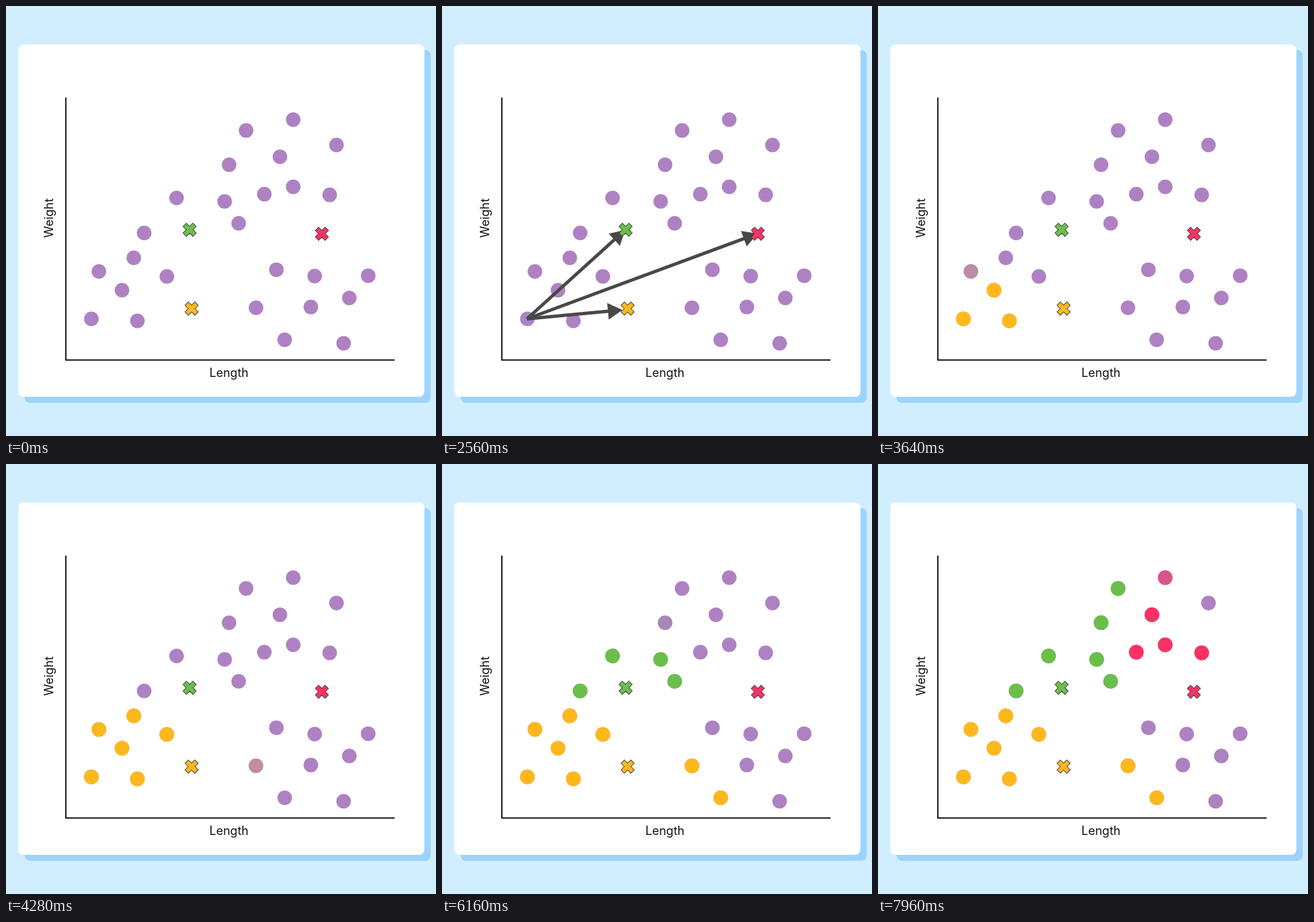
An HTML page for the animation above (8000 ms loop, 648 by 648 pixels).

```html
<!DOCTYPE html>
<html lang="en">
<head>
<meta charset="utf-8">
<title>Clustering</title>
<style>
  html, body { margin: 0; width: 100%; height: 100%; overflow: hidden; background: #d1eeff; }
  svg { display: block; width: 100%; height: 100%; }
  text { font: 18px Inter, sans-serif; text-anchor: middle; fill: #111; }
</style>
</head>
<body>
<svg id="stage" viewBox="0 0 648 648">
  <rect width="648" height="648" fill="#d1eeff"/>
  <rect x="28" y="66.5" width="612" height="531.5" rx="8" fill="#9dd4ff"/>
  <rect x="18.5" y="58" width="612" height="531" rx="8" fill="#fff"/>
  <path d="M90.2 138V533.4H585.5" fill="none" stroke="#111" stroke-width="2"/>
  <text x="336" y="559">Length</text>
  <text transform="translate(71 319.5) rotate(-90)">Weight</text>
  <g id="dots"></g>
  <g id="arrows" fill="#484848" stroke="#484848"></g>
  <g id="marks" stroke="#484848" stroke-width="1"></g>
</svg>
<script>
const LOOP = 8000;
const COLORS = { purple: '#ae82c2', gold: '#ffb81c', green: '#6abf4b', red: '#fa3264' };

// x, y, cluster colour, fade start, fade length
const DOTS = [
  [128.7, 471.5, 'gold', 2760, 300],
  [198, 474.5, 'gold', 3060, 300],
  [174.8, 428.3, 'gold', 3360, 260],
  [140, 400, 'gold', 3600, 240],
  [192.6, 379.5, 'gold', 3800, 220],
  [242.4, 407.5, 'gold', 3980, 220],
  [376.7, 454.8, 'gold', 4200, 360],
  [208.2, 342, 'green', 4560, 420],
  [420, 503, 'gold', 4860, 300],
  [257, 289.3, 'green', 5020, 280],
  [329.5, 294.5, 'green', 5280, 280],
  [350.6, 327.5, 'green', 5560, 280],
  [336.2, 239.2, 'green', 6130, 280],
  [361.8, 187.6, 'green', 6400, 280],
  [389.3, 283.6, 'red', 6680, 280],
  [412.8, 227.2, 'red', 6960, 280],
  [432.8, 272.5, 'red', 7240, 280],
  [487.8, 284.6, 'red', 7520, 280],
  [432.8, 171.3, 'red', 7800, 280],
  [498, 209.5], [407.5, 397.4], [465.2, 407], [545.8, 406.4],
  [517.4, 440], [459.4, 453.6], [508.8, 508.3]
];

// tip x, tip y, grow start, fade start
const ARROWS = [
  [272, 458, 720, 2560],
  [276, 337.5, 940, 2640],
  [475.5, 343, 1157, 2755]
];
const TAIL = { x: 128, y: 471.5 }, GROW = 400, FADE = 195;

const MARKS = [[276.7, 337.2, 'green'], [279.7, 456, 'gold'], [476, 343.2, 'red']];

const clamp = v => Math.max(0, Math.min(1, v));
const ease = p => p < 0.5 ? 2 * p * p : 1 - 2 * (1 - p) ** 2;

function add(parent, tag, attrs) {
  const el = document.createElementNS('http://www.w3.org/2000/svg', tag);
  for (const key in attrs) el.setAttribute(key, attrs[key]);
  return document.getElementById(parent).appendChild(el);
}

const fades = [];
for (const [cx, cy, color, start, length] of DOTS) {
  add('dots', 'circle', { cx, cy, r: 11, fill: COLORS.purple });
  if (color) {
    const el = add('dots', 'circle', { cx, cy, r: 11.1, fill: COLORS[color], opacity: 0 });
    fades.push({ el, start, length });
  }
}

const arrows = ARROWS.map(([x, y, grow, fade]) => {
  const dx = x - TAIL.x, dy = y - TAIL.y;
  const angle = Math.atan2(dy, dx) * 180 / Math.PI;
  const el = add('arrows', 'path', {
    transform: `translate(${TAIL.x} ${TAIL.y}) rotate(${angle})`, 'stroke-width': 0
  });
  return { el, size: Math.hypot(dx, dy), grow, fade };
});

for (const [x, y, color] of MARKS) {
  add('marks', 'path', {
    d: 'M-10.5-3.6h6.9v-6.9h7.2v6.9h6.9v7.2h-6.9v6.9h-7.2v-6.9h-6.9z',
    transform: `translate(${x} ${y}) rotate(45)`, fill: COLORS[color]
  });
}

function arrowPath(size) {
  const k = Math.min(1, size / 22), neck = size - 22 * k;
  return `M0-2.5H${neck}V${-12.5 * k}L${size} 0L${neck} ${12.5 * k}V2.5H0z`;
}

function draw() {
  const t = performance.now() % LOOP;
  for (const { el, start, length } of fades) {
    el.setAttribute('opacity', clamp((t - start) / length));
  }
  for (const { el, size, grow, fade } of arrows) {
    const p = ease(clamp((t - grow) / GROW));
    el.setAttribute('d', p ? arrowPath(size * p) : '');
    el.setAttribute('opacity', 1 - clamp((t - fade) / FADE));
  }
  requestAnimationFrame(draw);
}
draw();
</script>
</body>
</html>
```
